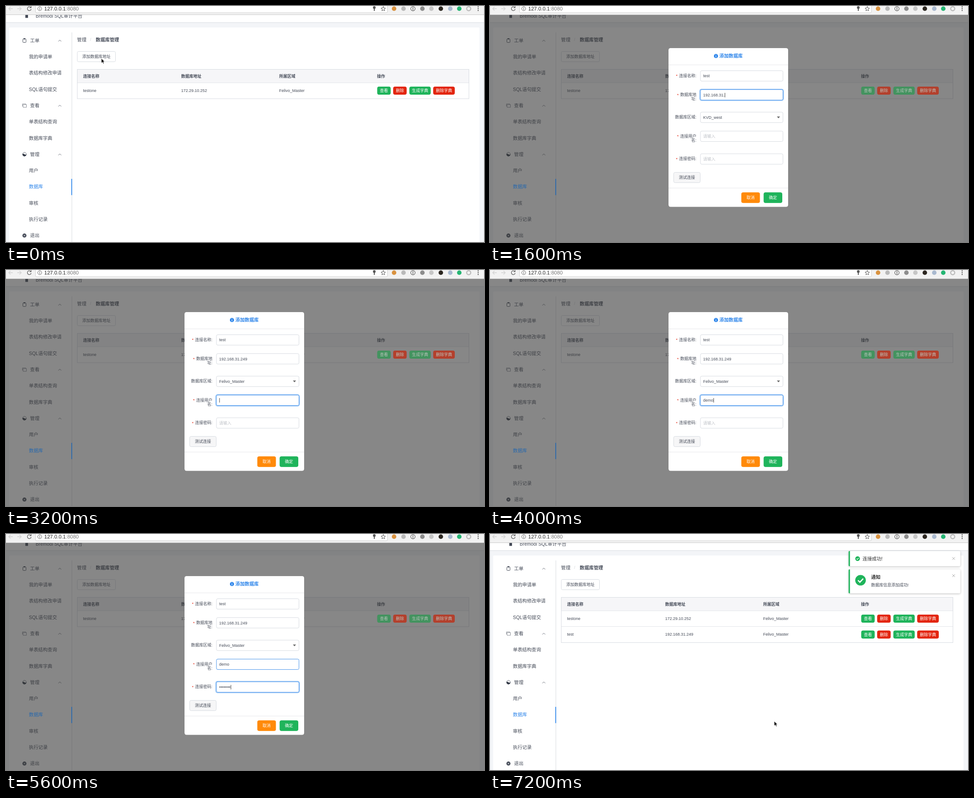
Recreate the animation shown at these times as an HTML page. Size 1063 by 527 pixels, loop 8000 ms.

```html
<!DOCTYPE html>
<html lang="zh-CN">
<meta charset="utf-8">
<title>数据库管理</title>
<style>
html, body { margin: 0; width: 100%; height: 100%; overflow: hidden; background: #fff }
svg { display: block; font-family: "Liberation Sans", "Noto Sans CJK SC", "Noto Sans CJK", "Noto Sans CJK JP", sans-serif }
text { white-space: pre }
</style>
<svg id="stage" width="1063" height="527" viewBox="0 0 1063 527"></svg>
<script>
const STEP = 800, LOOP = 8000;
const INK = '#454b58', BLUE = '#2d85ea', GREEN = '#1fb45b', RED = '#e3260f', LINE = '#d7dbe1';
const REGION = 'Felivo_Master', HOST = '192.168.31.249';

// Drawing helpers; text is centred vertically on y
const attrs = o => Object.entries(o).map(([k, v]) => ` ${k}="${v}"`).join('');
const text = (x, y, s, size = 9, fill = INK, more = {}) =>
  `<text${attrs({ x, y: y + size * .36, 'font-size': size, fill, ...more })}>${s}</text>`;
const box = (x, y, width, height, fill, more = {}) =>
  `<rect${attrs({ x, y, width, height, fill, ...more })}/>`;
const dot = (cx, cy, r, fill, more = {}) => `<circle${attrs({ cx, cy, r, fill, ...more })}/>`;
const stroke = (d, color, width = 1, more = {}) =>
  `<path${attrs({ d, stroke: color, 'stroke-width': width, fill: 'none', ...more })}/>`;
const shape = (d, fill, more = {}) => `<path${attrs({ d, fill, ...more })}/>`;
const at = (x, y, s) => `<g transform="translate(${x} ${y})">${s}</g>`;
const bold = { 'font-weight': 'bold' }, middle = { 'text-anchor': 'middle' };
const shadow = { style: 'filter:drop-shadow(0 1px 2px #0004)' };

const button = (x, y, w, h, label, fill, color = '#fff', border = fill) =>
  box(x, y, w, h, fill, { rx: 3, stroke: border }) + text(x + w / 2, y + h / 2, label, 9, color, middle);

const cursors = {
  arrow: shape('M0 0V10.5L2.5 8.3 4.2 12 6 11.2 4.4 7.6H7.6Z', '#111', { stroke: '#fff', 'stroke-width': .8 }),
  hand: shape('M-2 -5Q-.8 -6.5 .2 -5L1 -2 6 -.5Q7.2 0 6.6 2L5.5 6.5H-.5L-4 2Q-4.3 .3 -2.5 1L-1.2 2Z',
    '#fff', { stroke: '#111', 'stroke-width': 1.1, 'stroke-linejoin': 'round' }),
  beam: dot(0, 0, 12, 'none', { stroke: '#111', 'stroke-width': 1.7 }) +
    stroke('M-2.5 -5.5Q0 -5.5 0 -4Q0 -5.5 2.5 -5.5M0 -4V4M-2.5 5.5Q0 5.5 0 4Q0 5.5 2.5 5.5M-1.5 1H1.5', '#111', 1.2)
};

function browserBar() {
  const grey = '#777';
  const icons = [[863, '#d9923f'], [884, '#b9b9b9'], [926, '#8d8d8d'], [946, '#c6c6c6'],
    [967, '#2b2620'], [988, '#a9b9cf'], [1008, '#25b573']];
  return box(0, 0, 1063, 19.5, '#f2f2f2') +
    box(65.5, -12, 783, 27, '#fff', { rx: 3, stroke: '#d0d0d0' }) +
    stroke('M0 19.5H1063', '#c9c9c9') +
    stroke('M15 6H6M10 2L6 6 10 10M25 6H34M30 2L34 6 30 10', '#d2d2d2', 1.3) +
    stroke('M55 3A4.3 4.3 0 1 0 56 7', '#666', 1.4) + shape('M56.5 0V4.5H52Z', '#666') +
    dot(75, 6, 4.4, 'none', { stroke: '#666' }) + stroke('M75 5V8.5M75 3V4', '#666', 1.2) +
    text(85, 6, `127.0.0.1<tspan fill="${grey}">:8080</tspan>`, 11.5, '#222') +
    dot(819, 3.5, 3, '#555') + box(818, 5, 2, 6, '#555') +
    stroke('M839 1L840.4 4.5 844 4.8 841.2 7.2 842.1 10.8 839 8.8 835.9 10.8 836.8 7.2 834 4.8 837.6 4.5Z', '#555') +
    icons.map(([x, c]) => dot(x, 6, 5, c)).join('') +
    dot(905, 6, 4.7, '#fff', { stroke: '#555', 'stroke-width': 1.3 }) + box(904.3, 3, 1.5, 6, '#555') +
    dot(1029, 6, 4.5, 'none', { stroke: '#bbb', 'stroke-width': 2.4 }) +
    [2, 6, 10].map(y => dot(1050, y, 1.2, '#555')).join('');
}

const menu = ['#工单', '我的申请单', '表结构修改申请', 'SQL语句提交', '#查看', '单表结构查询', '数据库字典',
  '#管理', '用户', '数据库', '审核', '执行记录', '#退出'];

const menuIcons = {
  工单: box(-3.5, -3.5, 7, 8, 'none', { rx: 1, stroke: INK }) + box(-2, -5, 4, 2.5, INK),
  查看: stroke('M-4.5 2V-3.5H3V-2M-3 -2H4.5V4H-3Z', '#7b808a', .9),
  管理: dot(0, 0, 4.2, '#fff', { stroke: INK, 'stroke-width': .8 }) + shape('M-4.3 0Q-2 -2 0 0T4.3 0A4.3 4.3 0 0 1 -4.3 0', '#333946'),
  退出: dot(0, 0, 4.5, INK) + stroke('M-1.5 -1.5L1.5 1.5M1.5 -1.5L-1.5 1.5', '#fff')
};

function sidebar() {
  return stroke('M146.5 59V527', '#d9dbdf') + menu.map((item, i) => {
    const y = 77 + i * 36.3;
    if (item[0] != '#') return item == '数据库' ? '' : text(51, y, item, 10.4);
    const name = item.slice(1);
    return at(41, y, menuIcons[name]) + text(53.5, y, name, 10.4) +
      (name == '退出' ? '' : stroke(`M116.5 ${y + 2.2}l3.2 -3.2l3.2 3.2`, '#666b76'));
  }).join('');
}

const columns = [171.5, 389.5, 607.5, 825];

function tableFrame(rows) {
  const bottom = 171.5 + 35.5 * rows.length;
  return box(158.5, 141.5, 871, bottom - 141.5, '#fff', { stroke: LINE }) +
    box(159, 142, 870, 29, '#f6f6f8') + stroke('M159 171.5H1029', '#e3e5e9') +
    ['连接名称', '数据库地址', '所属区域', '操作'].map((s, i) => text(columns[i], 156.5, s, 9, INK, bold)).join('') +
    rows.map((row, r) => {
      const y = 188.7 + 35.5 * r;
      return (r ? stroke(`M159 ${y - 17.7}H1029`, '#e3e5e9') : '') +
        row.map((s, i) => text(columns[i], y, s)).join('');
    }).join('');
}

// Coloured parts keep more of their tint under the mask
function accents(count, dim) {
  const g = dim ? '#43935f' : GREEN, r = dim ? '#b3402d' : RED, t = dim ? '#bcc4be' : '#fff';
  const blue = dim ? '#2768ad' : BLUE;
  let s = text(51, 403.7, '数据库', 10.4, blue) + box(145.3, 386, 1.8, 36.3, blue);
  for (let i = 0; i < count; i++) {
    const y = 180.5 + 35.5 * i;
    s += button(826, y, 29, 17, '查看', g, t) + button(861.5, y, 29, 17, '删除', r, t) +
      button(897.5, y, 46.5, 17, '生成字典', g, t) + button(950.5, y, 47, 17, '删除字典', r, t);
  }
  return s;
}

function page(dim, added) {
  const rows = [['testone', '172.29.10.252', REGION]];
  if (added) rows.push(['test', HOST, REGION]);
  return box(0, 0, 1063, 527, '#f3f5f8') + box(0, 19, 1063, 18, '#fff') + stroke('M0 37H1063', '#d8dce2') +
    box(43, 18, 6, 8.5, INK) + text(66, 22, 'Bremodi SQL审计平台', 10.4) +
    box(7, 48, 1046, 490, '#fff', { rx: 2 }) + sidebar() +
    text(158, 75, '管理', 10.4) + text(187, 75, '/', 9, '#cfd2d8') + text(199.5, 75, '数据库管理', 10.4, INK, bold) +
    button(158.5, 101.5, 85, 23, '添加数据库地址', '#fff', INK, LINE) + tableFrame(rows) +
    (dim ? box(0, 19, 1063, 508, '#373737', { opacity: .6 }) : '') + accents(rows.length, dim);
}

const fields = [
  { key: 'name', y: 144.5, label: ['连接名称:'] },
  { key: 'host', y: 186.7, label: ['数据库地', '址:'] },
  { key: 'region', y: 237, label: ['数据库区域:'] },
  { key: 'user', y: 279.3, label: ['连接用户', '名:'] },
  { key: 'pass', y: 330, label: ['连接密码:'] }
];

function field({ key, y, label }, state) {
  const mid = y + 11.7, focus = state.focus == key, lit = focus || state.hover == key;
  const select = key == 'region', value = state[key] || '';
  const tip = state.open ? 'M638 250.5h7l-3.5 -4z' : 'M638 246.7h7l-3.5 4z';
  let s = label.map((l, i) => text(459, mid - .6 + 9 * i, l, 9, INK, { 'text-anchor': 'end' })).join('');
  if (!select) s += text(459 - 9 * label[0].replace(':', '').length - (label[1] ? 7 : 9.5), mid, '*', 9, RED);
  if (focus) s += box(466.5, y - 1, 186, 25.5, 'none', { rx: 4, stroke: '#8fc0f5', 'stroke-width': 1.6 });
  s += box(468, y, 183.5, 23.3, '#fff', { rx: 3, stroke: lit ? '#4592ea' : LINE });
  // The caret is a narrow bar following the typed text
  const caret = focus && state.caret ? `<tspan dx="-.5" fill="#222" font-size="10.5">|</tspan>` : '';
  s += value || caret ? text(474, mid, value + caret) : text(474, mid, '请输入', 9, '#bfc2c8');
  return s + (select ? shape(tip, '#666') : '');
}

function dropdown() {
  const items = ['KVD_west', 'KVD_sp', REGION, 'Felivo_SZ'];
  return box(467.5, 264.5, 184.5, 90.5, '#fff', { rx: 3, ...shadow }) +
    box(467.5, 268, 184.5, 20.7, BLUE) + box(467.5, 288.7, 184.5, 20.6, '#f4f4f5') +
    items.map((s, i) => text(479.5, 278.4 + 20.7 * i, s, 9, i ? INK : '#fff')).join('');
}

function dialog(state) {
  const hot = state.focus == 'test';
  return box(397, 94, 266, 354.5, '#fff', { rx: 4.5 }) +
    stroke('M397 131.5H663M397 406.5H663', '#e6e8ea') +
    dot(502.5, 111.7, 4.6, BLUE) + stroke('M502.5 111V114.4M502.5 108.8V110', '#fff', 1.2) +
    text(510, 111.7, '添加数据库', 10.4, BLUE, bold) +
    fields.map(f => field(f, state)).join('') +
    button(408.5, 371.5, 59, 23, '测试连接', hot ? '#fff' : '#f6f6f7', hot ? '#4592ea' : INK, hot ? '#4592ea' : LINE) +
    button(559.3, 416.7, 40.5, 22.6, '取消', '#ff8a0a') + button(609, 416.7, 40.5, 22.6, '确定', GREEN) +
    (state.open ? dropdown() : '');
}

const tick = (x, y, r) => dot(x, y, r, GREEN) +
  stroke(`M${x - r * .48} ${y}l${r * .36} ${r * .36}l${r * .62} ${-r * .66}`, '#fff', r * .22);
const card = (y, h, closeY) => box(797.5, y, 248.5, h, '#fff', { rx: 3, ...shadow }) +
  shape(`M800.5 ${y}h-1q-2 0 -2 2v${h - 4}q0 2 2 2h1z`, GREEN) +
  stroke(`M1028 ${closeY - 3}l6 6m0 -6l-6 6`, '#a0a0a0', .9);

function notices(count) {
  let s = '';
  if (count) s += card(38, 34, 54.7) + tick(817.5, 55, 5.2) + text(828.5, 55, '连接成功!', 10.4, '#333', bold && {});
  if (count > 1) s += card(79, 53.5, 93) + tick(824, 103.3, 11.8) +
    text(847.5, 96.5, '通知', 10.4, '#333', bold) + text(847.5, 113.7, '数据库信息添加成功!');
  return s;
}

// One state per step
const blank = { dialog: true, region: 'KVD_west' };
const named = { ...blank, name: 'test', host: HOST };
const chosen = { ...named, region: REGION };
const signed = { ...chosen, user: 'demo' };
const secret = '•'.repeat(8);
const states = [
  { cursor: ['arrow', 212, 117] },
  { ...blank, hover: 'name', cursor: ['beam', 480, 155.5] },
  { ...named, host: '192.168.31.', focus: 'host', caret: true },
  { ...named, focus: 'region', open: true, cursor: ['hand', 515, 318.5] },
  { ...chosen, focus: 'user', caret: true },
  { ...signed, focus: 'user', caret: true },
  { ...signed, hover: 'user', pass: '•••', focus: 'pass', caret: true },
  { ...signed, hover: 'user', pass: secret, focus: 'pass', caret: true },
  { ...signed, pass: secret, focus: 'test', notices: 1, cursor: ['hand', 445, 382] },
  { added: true, notices: 2, cursor: ['arrow', 632, 418] }
];

const stage = document.getElementById('stage');
let shown = -1;

function render(step) {
  const s = states[step];
  let out = page(s.dialog, s.added) + browserBar();
  if (s.dialog) out += dialog(s);
  out += notices(s.notices || 0);
  if (s.cursor) out += at(s.cursor[1], s.cursor[2], cursors[s.cursor[0]]);
  stage.innerHTML = out;
}

const start = performance.now();
function frame() {
  const step = Math.floor((performance.now() - start) % LOOP / STEP);
  if (step != shown) render(shown = step);
  requestAnimationFrame(frame);
}
frame();
</script>
</html>
```
